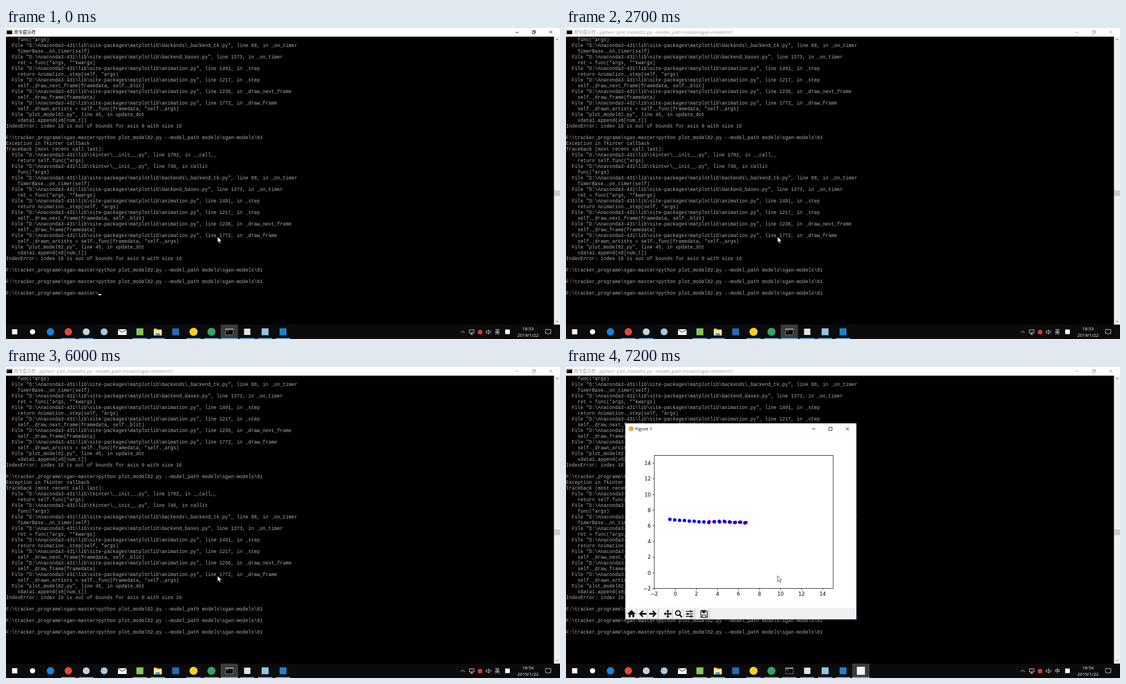
Animation of 960 by 540 pixels, one loop 7.3 s. Source, as an HTML page with a canvas:

```html
<!DOCTYPE html>
<html lang="zh">
<head>
<meta charset="utf-8">
<title>Console and figure</title>
<style>
  html, body { margin: 0; width: 100%; height: 100%; overflow: hidden; background: #000; }
  canvas { display: block; }
</style>
</head>
<body>
<canvas id="stage" width="960" height="540"></canvas>
<script>
const stage = document.getElementById('stage').getContext('2d');
const layer = stage.canvas.cloneNode().getContext('2d');
let g = stage;
const LOOP = 7300, STEP = 100;
const RECALL = 300, RUN = 600, BLUR = 1300, MINUTE = 5800, OPEN = 6100, FIRST_DOT = 6200, IME = 6500;
const UI = '"Open Sans", "Noto Sans CJK SC", "Noto Sans CJK", sans-serif';
const CJK = '"Noto Sans CJK SC", "Noto Sans CJK", sans-serif';

const raw = String.raw;
const lib = raw`  File "D:\Anaconda3-431\lib`;
const mpl = lib + raw`\site-packages\matplotlib`;
const prompt = raw`F:\tracker_programe\sgan-master>`;
const command = raw`python plot_model02.py --model_path models\sgan-models\01`;
const step = (line, name, code) => [mpl + raw`\animation.py", line ${line}, in ${name}`, '    ' + code];
const trace = [
  '    func(*args)',
  mpl + raw`\backends\_backend_tk.py", line 88, in _on_timer`,
  '    TimerBase._on_timer(self)',
  mpl + raw`\backend_bases.py", line 1373, in _on_timer`,
  '    ret = func(*args, **kwargs)',
  ...step(1491, '_step', 'return Animation._step(self, *args)'),
  ...step(1217, '_step', 'self._draw_next_frame(framedata, self._blit)'),
  ...step(1236, '_draw_next_frame', 'self._draw_frame(framedata)'),
  ...step(1772, '_draw_frame', 'self._drawn_artists = self._func(framedata, *self._args)'),
  '  File "plot_model02.py", line 45, in update_dot',
  '    xdata1.append(x0[num_t])',
  'IndexError: index 16 is out of bounds for axis 0 with size 16',
  ''
];
const log = [
  ...trace, prompt + command,
  'Exception in Tkinter callback', 'Traceback (most recent call last):',
  lib + raw`\tkinter\__init__.py", line 1702, in __call__`, '    return self.func(*args)',
  lib + raw`\tkinter\__init__.py", line 746, in callit`,
  ...trace, prompt + command, '', prompt + command, ''
];

function rect(x, y, w, h, color) { g.fillStyle = color; g.fillRect(x, y, w, h); }
function disc(x, y, r, color) {
  g.fillStyle = color;
  g.beginPath(); g.arc(x, y, r, 0, 7); g.fill();
}
function text(s, x, y, size, color, family = UI, align = 'left') {
  g.font = `${size}px ${family}`;
  g.fillStyle = color;
  g.textAlign = align;
  g.fillText(s, x, y);
}
function path(d, color, width, x = 0, y = 0) {
  const p = new Path2D(d);
  g.save();
  g.translate(x, y);
  if (width) { g.strokeStyle = color; g.lineWidth = width; g.stroke(p); }
  else { g.fillStyle = color; g.fill(p); }
  g.restore();
}

function drawConsole(t) {
  rect(0, 0, 960, 540, '#000');
  const last = prompt + (t >= RECALL ? command : '');
  [...log, last].forEach((s, i) => text(s, 0, 23 + 10 * i, 8.3333, '#acacac', '"Liberation Mono", monospace'));

  if (t < BLUR && t % 1060 < 530 || t >= 800 && t < 1000) {
    if (t >= RUN) rect(0, 472, 5, 2, '#eee');
    else rect(last.length * 5, 462, 5, 2, '#eee');
  }

  const ink = t < BLUR ? '#000' : '#999';
  rect(0, 0, 960, 15, '#fff');
  rect(1, 3, 10, 8, '#999');
  rect(1.5, 5, 9, 5.5, '#000');
  text('命令提示符', 14, 10.3, 7.5, ink, CJK);
  if (t >= RUN) text('- python  ' + command.slice(7), 53.5, 10, 7.9, ink);
  path('M883 7.5h5M912 6h4v4h-4zM913.5 6v-1.5h4v4h-1.5M941.5 4.5l5 5M946.5 4.5l-5 5', ink, .8);

  rect(949.5, 15, 10.5, 500, '#f0f0f0');
  rect(950, 282, 10, 10, '#cdcdcd');
  path('M953 21l2-2 2 2M953 508.5l2 2 2-2', '#505050', 1);
}

function drawTaskbar(t) {
  const shown = t >= OPEN;
  rect(0, 515, 960, 25, '#0b0b0c');
  const slot = i => 15 + 31 * i;
  const active = shown ? 16 : 12;
  rect(slot(active) - 15, 515, 30, 25, '#3a3b3c');
  for (const i of [3, 4, 7, 8, 10, 11, 12, 13, 14, 15, 16]) {
    const w = i === active ? 30 : 25;
    if (i < 16 || shown) rect(slot(i) - w / 2, 538.5, w, 1.5, '#76b9ed');
  }

  const square = (i, size, color) => rect(slot(i) - size / 2, 527.5 - size / 2, size, size, color);
  const circle = (i, r, color) => disc(slot(i), 527.5, r, color);
  square(0, 9, '#fff');
  circle(1, 4.5, '#fff');
  circle(2, 6.5, '#1483d8');
  circle(3, 6.5, '#e04a3a');
  circle(4, 6, '#c3d3e0');
  circle(5, 6, '#a9cbdc');
  rect(194, 523, 15, 10, '#fff');
  path('M194 523.5l7.5 5 7.5-5', '#0b0b0c', 1);
  square(7, 12, '#84c65a');
  path('M256 522h5l1.5 1.5h7.5v10.5h-14z', '#f3c64e');
  rect(256, 525, 14, 7, '#ffe596');
  rect(259.5, 530, 7, 4, '#3f9ad8');
  square(9, 12, '#2a68b4');
  circle(10, 7, '#f8d020');
  circle(11, 7, '#2fa463');
  rect(380, 522, 14, 11, '#aaa');
  rect(380.7, 524, 12.6, 8.3, '#000');
  path('M382 526h4', '#ddd', .8);
  square(13, 11, '#dfe4e8');
  square(14, 12, '#8fc6de');
  square(15, 12, '#1b83cf');
  if (shown) square(16, 14, '#f4f4f4');

  path('M788 529.5l3.5-3.5 3.5 3.5M803 524h8v5.5h-8zM805 532h4M807 529.5v2.5', '#eee', .9);
  disc(821.5, 528, 4, '#d83a2c');
  path('M832 526.3h2l2.5-2.3v7.5l-2.5-2.3h-2z', '#eee', .8);
  path('M838 526q1.3 1.8 0 3.6M839.5 524.8q2.4 3 0 6', '#bbb', .7);
  text(t < IME ? '英' : '中', 851.5, 530.8, 8.8, '#fff', CJK, 'center');
  rect(865, 523.5, 8, 8, '#fff');
  text(t < MINUTE ? '18:53' : '18:54', 904.5, 524.5, 7.8, '#fff', UI, 'center');
  text('2019/1/22', 904.5, 536.3, 7.8, '#fff', UI, 'center');
  path('M935 523.5h9v7h-3l-1.5 2-1.5-2h-3z', '#eee', .8);
}

// Points in window pixels: the true track in blue, the prediction in red.
const blueY = [264.6, 265.6, 266.2, 266.4, 267.4, 267.7, 268.7, 268.9, 270, 268.7, 268, 268, 269, 270, 269.6, 270.7];
const redY = [268.6, 268.6, 269.2, 269, 269.6, 269.8, 269.4, 270];
const blueX = i => i < 9 ? 180 + 8.42 * i : 256.6 + 8.9 * (i - 9);
const redX = i => 248.2 + 9.12 * i;

function drawAxes(count) {
  const left = 153, bottom = 384.5, ux = 310 / 17, uy = 231 / 17;
  const label = (v, x, y, align) => text(String(v).replace('-', '−'), x, y, 8.68, '#000', '"DejaVu Sans", sans-serif', align);
  for (let v = -2; v <= 14; v += 2) {
    const x = left + (v + 2) * ux, y = bottom - (v + 2) * uy;
    path(`M${x} ${bottom}v3M${left} ${y}h-3`, '#000', .75);
    label(v, x, 397.2, 'center');
    label(v, 147, y + 3.2, 'right');
  }
  redY.slice(0, Math.max(0, count - 8)).forEach((y, i) => disc(redX(i), y, 3, '#f00'));
  blueY.slice(0, count).forEach((y, i) => disc(blueX(i), y, 3, '#00f'));
  path(`M${left} ${bottom}v-231h310v231z`, '#000', .8);
}

function drawToolbar() {
  rect(103, 418, 400, 20, '#f0f0f0');
  for (const x of [104, 123, 142, 167, 186, 205, 230]) {
    path('M0 18v-18h18', '#fff', .7, x, 419.5);
    path('M18 0v18h-18', '#a0a0a0', .7, x, 419.5);
  }
  const ink = '#111';
  path('M113.5 422l7 6.3-1 1-1.2-1v6.2h-3.3v-4h-3v4h-3.3v-6.2l-1.2 1-1-1z', ink);
  const arrow = 'M-6.5 0l6-6 1.7 1.7-2.9 2.9h8v2.8h-8l2.9 2.9-1.7 1.7z';
  path(arrow, ink, 0, 133, 428.5);
  g.save();
  g.translate(150.5, 428.5);
  g.scale(-1, 1);
  path(arrow, ink);
  g.restore();
  path('M-5 0h10M0-5v10', ink, 2, 176.5, 428.5);
  path('M-7 0l3-3v6zM7 0l-3-3v6zM0-7l-3 3h6zM0 7l-3-3h6z', ink, 0, 176.5, 428.5);
  g.beginPath(); g.arc(194, 427.3, 4, 0, 7);
  g.strokeStyle = ink; g.lineWidth = 2; g.stroke();
  path('M197 430.3l4 4', ink, 2.6);
  path('M207.5 424.3h13M207.5 428.7h13M207.5 433h13', ink, 1.3);
  path('M216 422.5v3.6M211 426.9v3.6M217 431.2v3.6', ink, 2.4);
  path('M233.8 423h9l2 2v9.5h-11z', ink, 1.3);
  rect(236, 423, 5.5, 4, ink);
  rect(236, 430, 6.5, 4, ink);
  rect(237, 431, 4.5, 3, '#f0f0f0');
}

// The window is painted opaque on its own layer, then faded in as a whole.
function drawFigure(t) {
  if (t < OPEN) return;
  const p = Math.min(1, (t - OPEN) / 250), ease = 1 - (1 - p) ** 3.6;
  const scale = 1 - .056 * (1 - ease);
  g = layer;
  g.clearRect(0, 0, 960, 540);
  g.save();
  g.translate(103, 98);
  g.scale(scale, scale);
  g.translate(-103, -98);
  rect(102.5, 97.5, 401, 341, '#3a83c4');
  rect(103, 98, 400, 340, '#fff');
  rect(232, 117, 271, .6, '#eee');
  disc(113, 107.3, 4.5, '#d9b45c');
  text('Figure 1', 120, 110.3, 7.9, '#000');
  path('M426.5 107.5h5.5M455.5 104.7h5.5v5.5h-5.5zM485 104.7l5.5 5.5M490.5 104.7l-5.5 5.5', '#000', .8);
  drawAxes(t < FIRST_DOT ? 0 : Math.min(16, 1 + Math.floor((t - FIRST_DOT) / 66)));
  drawToolbar();
  g.restore();
  g = stage;
  g.globalAlpha = ease;
  g.drawImage(layer.canvas, 0, 0);
  g.globalAlpha = 1;
}

function drawPointer() {
  const d = 'M0 0v10l2.3-2 1.6 3.6 1.7-.8-1.6-3.4h3.1z';
  path(d, '#fff', 0, 366.6, 362.4);
  path(d, '#000', .6, 366.6, 362.4);
}

let shownTime = -1;
function tick() {
  const t = Math.floor(performance.now() % LOOP / STEP) * STEP;
  if (t !== shownTime) {
    shownTime = t;
    drawConsole(t);
    drawTaskbar(t);
    drawFigure(t);
    drawPointer();
  }
  requestAnimationFrame(tick);
}
tick();
</script>
</body>
</html>
```
